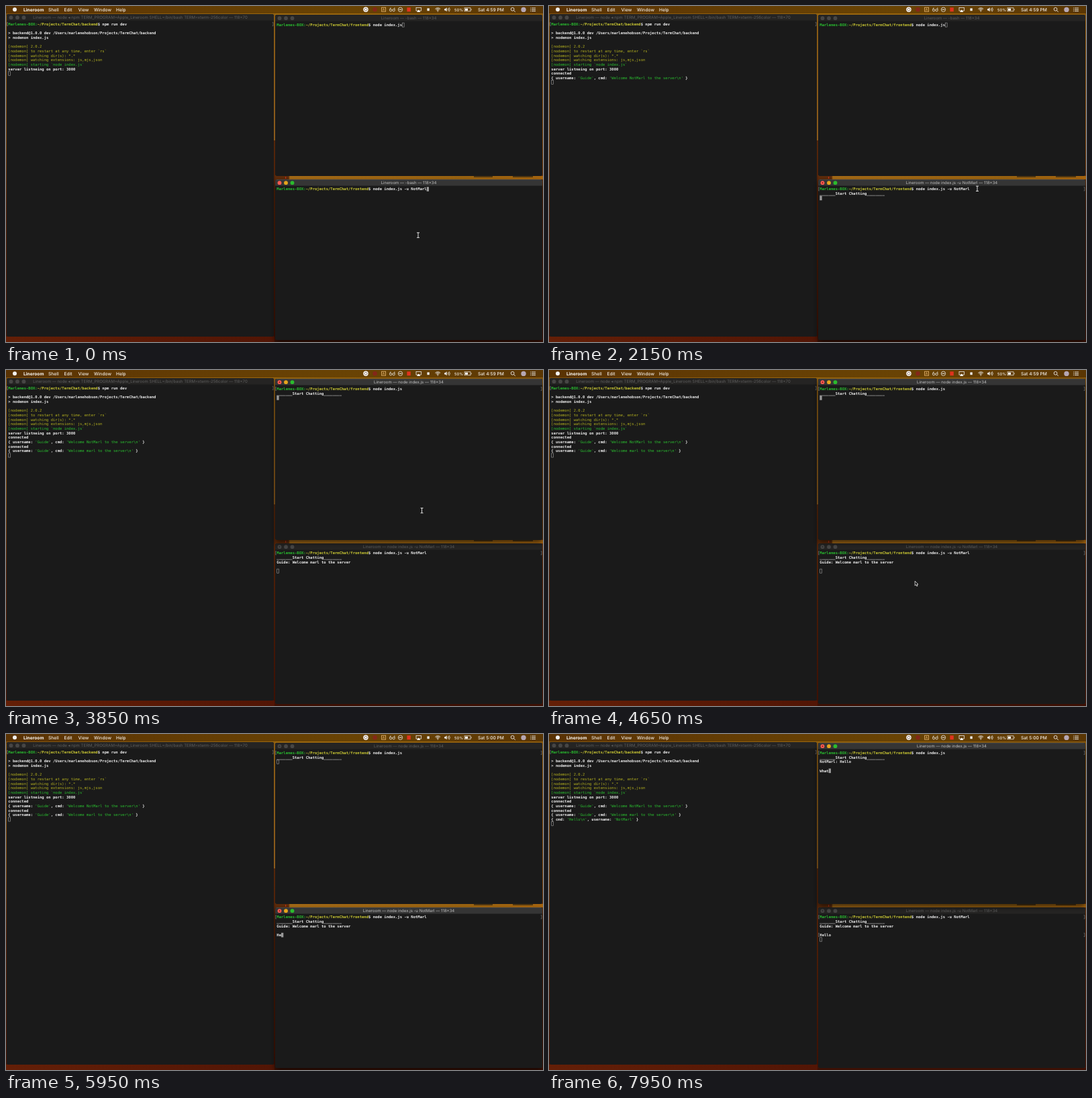
An HTML page with a canvas for the animation above (8 s loop, 800x500 px).

```html
<!DOCTYPE html>
<html lang="en">
<head>
<meta charset="utf-8">
<title>Chat demo</title>
<style>
html, body { margin: 0; width: 100%; height: 100%; overflow: hidden; background: #1a1a1a; }
canvas { display: block; width: 800px; height: 500px; }
</style>
</head>
<body>
<canvas id="stage" width="800" height="500"></canvas>
<script>
const ctx = document.getElementById('stage').getContext('2d');
ctx.textRendering = 'geometricPrecision';

const LOOP = 8000;
const UI = 'Inter, "Open Sans", sans-serif';
const MONO = '"DejaVu Sans Mono", "Liberation Mono", monospace';
const CHAR = 3.334, LINE = 6.655, MONO_SIZE = 5.54;
const WHITE = '#ececec', GREEN = '#2abf30', YELLOW = '#b3b01f', PATH = '#cfcd34';

const APP = 'Lineroom', HOST = 'Marlenes-BOX', HOME = 'marlenehobson';
const NICK = 'NotMarl', FRIEND = 'marl', BOSS = 'Guide';

// Moments of the session, in ms
const T = {
  run1: 1350, join1: 1500, focusTop: 2700, run2: 3450, join2: 3600,
  focusBottom: 4950, clock: 5200, hide1: 5500, send: 6550, show: 6750,
  focusTop2: 7200, hide2: 7450
};
const HELLO = [5750, 5880, 6040, 6180, 6320];
const WHAT = [7550, 7650, 7750, 7870];
const MOUSE = [
  [0, 614, 341], [200, 614, 341], [850, 638, 314], [1950, 638, 314],
  [2150, 638, 272], [2550, 648, 167], [3600, 648, 167], [4500, 546, 318],
  [6750, 546, 318], [7100, 600, 165], [8000, 600, 165]
];

const LEFT = { x: 1, y: 12, w: 398, h: 480, textY: 27 };
const TOP = { x: 401, y: 13, w: 398, h: 240, textY: 28 };
const BOTTOM = { x: 401, y: 258, w: 398, h: 239, textY: 272.4 };

function rect(x, y, w, h, color) {
  ctx.fillStyle = color;
  ctx.fillRect(x, y, w, h);
}

function disc(x, y, r, color) {
  ctx.fillStyle = color;
  ctx.beginPath();
  ctx.arc(x, y, r, 0, 7);
  ctx.fill();
}

function ring(x, y, r, color, width = 0.8) {
  ctx.strokeStyle = color;
  ctx.lineWidth = width;
  ctx.beginPath();
  ctx.arc(x, y, r, 0, 7);
  ctx.stroke();
}

function stroke(points, color, width) {
  ctx.strokeStyle = color;
  ctx.lineWidth = width;
  ctx.beginPath();
  points.forEach(([x, y], i) => i ? ctx.lineTo(x, y) : ctx.moveTo(x, y));
  ctx.stroke();
}

function gradient(x0, y0, x1, y1, stops) {
  const g = ctx.createLinearGradient(x0, y0, x1, y1);
  stops.forEach(([at, color]) => g.addColorStop(at, color));
  return g;
}

// Set large and scaled down evenly, so that small sizes keep exact spacing
function text(s, x, y, size, color, family, weight = 400, align = 'left') {
  ctx.save();
  ctx.translate(x, y);
  ctx.scale(0.1, 0.1);
  ctx.font = `${weight} ${size * 10}px ${family}`;
  ctx.textAlign = align;
  ctx.fillStyle = color;
  ctx.fillText(s, 0, 0);
  ctx.restore();
}

function drawDesktop() {
  rect(0, 0, 800, 500, gradient(0, 0, 0, 500,
    [[0, '#9a6210'], [0.4, '#84490f'], [0.6, '#5c2409'], [1, '#4a1404']]));
  rect(0, 10, 800, 4, gradient(0, 0, 800, 0,
    [[0, '#80500c'], [0.5, '#9c680e'], [1, '#8a590c']]));
  rect(399, 12, 2, 188, gradient(0, 12, 0, 200, [[0, '#8a5c14'], [1, '#8a5a1c']]));
  rect(399, 200, 2, 300, gradient(0, 200, 0, 500, [[0, '#55260a'], [1, '#3d1004']]));
  rect(401, 253, 399, 5, gradient(401, 0, 800, 0,
    [[0, '#5c2a0a'], [0.05, '#5c2a0a'], [0.055, '#a56a16'], [0.7, '#9c6410'], [1, '#a8660f']]));
  rect(697, 253, 28, 2, '#54380f');
  rect(755, 253, 30, 2, '#54380f');
  rect(416, 254, 1.2, 3, '#c2331b');
  rect(0, 492, 400, 8, gradient(0, 0, 400, 0, [[0, '#641f07'], [1, '#521505']]));
  rect(400, 497, 400, 3, '#3c1004');
}

function drawMenuBar(t) {
  rect(0, 0, 800, 11, gradient(0, 0, 800, 0,
    [[0, '#593203'], [0.35, '#643d04'], [0.65, '#694304'], [1, '#5a3604']]));
  disc(13, 5.2, 3, '#f2f2f2');
  text(APP, 26, 7.8, 6.67, '#fff', UI, 700);
  [['Shell', 63], ['Edit', 86.5], ['View', 107.5], ['Window', 131], ['Help', 164]]
    .forEach(([s, x]) => text(s, x, 7.8, 6.67, '#f4f0ec', UI, 500));

  disc(536, 5.3, 3.7, '#fff');
  ring(536, 5.3, 2, '#6a4a35', 0.7);
  disc(549.6, 5.3, 3.2, '#842719');
  ctx.strokeStyle = '#e0b06a';
  ctx.lineWidth = 0.9;
  ctx.strokeRect(559.6, 2.2, 6, 6);
  text('A', 562.6, 7.2, 5, '#e0b06a', UI, 500, 'center');
  ring(573.2, 6.2, 1.7, '#eee');
  ring(577.6, 6.2, 1.7, '#eee');
  stroke([[571.7, 5], [573.2, 2.3]], '#eee', 0.7);
  stroke([[579, 5], [578.8, 2.3]], '#eee', 0.7);
  ring(587.5, 5.3, 3.2, '#eee');
  stroke([[585.4, 5.3], [589.6, 5.3]], '#eee', 1);
  rect(597.4, 2.3, 5.4, 6, '#e0331e');

  ctx.strokeStyle = '#eee';
  ctx.lineWidth = 0.8;
  ctx.strokeRect(611, 2.4, 7.4, 4.6);
  ctx.fillStyle = '#fff';
  ctx.beginPath();
  ctx.moveTo(614.7, 5.5);
  ctx.lineTo(617.4, 9);
  ctx.lineTo(612, 9);
  ctx.fill();
  rect(627.4, 3.4, 3.4, 3.8, '#eee');

  ctx.lineWidth = 0.9;
  [1.8, 3.5, 5.2].forEach(r => {
    ctx.beginPath();
    ctx.arc(643.3, 8, r, -Math.PI * 0.77, -Math.PI * 0.23);
    ctx.stroke();
  });
  disc(643.3, 7.9, 0.7, '#eee');

  ctx.fillStyle = '#eee';
  ctx.beginPath();
  [[653, 4.2], [654.4, 4.2], [656.6, 2.3], [656.6, 8.3], [654.4, 6.4], [653, 6.4]]
    .forEach(([x, y]) => ctx.lineTo(x, y));
  ctx.fill();
  ctx.lineWidth = 0.7;
  [2, 3.5, 5].forEach(r => {
    ctx.beginPath();
    ctx.arc(656.3, 5.3, r, -0.7, 0.7);
    ctx.stroke();
  });

  text('50%', 668, 7.5, 5.8, '#f4f0ec', UI, 500);
  ctx.strokeRect(683, 2.8, 9, 5);
  rect(684, 3.8, 4, 3, '#fff');
  rect(692.7, 4.3, 0.8, 2, '#eee');
  text(t < T.clock ? 'Sat 4:59 PM' : 'Sat 5:00 PM', 703, 7.8, 6.67, '#f4f0ec', UI, 500);
  ring(754.6, 4.8, 2.4, '#eee', 0.9);
  stroke([[756.4, 6.6], [758.7, 8.8]], '#eee', 1);
  disc(771, 5.4, 3.7, '#b6a7b4');
  [3, 5.3, 7.6].forEach(y => {
    rect(781, y - 0.4, 1, 0.9, '#eee');
    rect(783, y - 0.4, 6, 0.9, '#eee');
  });
}

function drawWindow(win, title, active, running) {
  const { x, y, w, h } = win;
  ctx.save();
  if (active) {
    ctx.shadowColor = 'rgba(0,0,0,.6)';
    ctx.shadowBlur = 9;
    ctx.shadowOffsetY = 4;
  }
  ctx.fillStyle = '#1a1a1a';
  ctx.beginPath();
  ctx.roundRect(x, y, w, h, 2.5);
  ctx.fill();
  ctx.restore();
  ctx.fillStyle = active ? '#353535' : '#252423';
  ctx.beginPath();
  ctx.roundRect(x, y, w, 9.6, [2.5, 2.5, 0, 0]);
  ctx.fill();
  if (active) rect(x + 2, y, w - 4, 0.6, '#505050');
  const cy = y + 5.2;
  ['#fb5a50', '#e5a51c', '#2bbb2e'].forEach((color, i) =>
    disc(x + 6.5 + i * 9.5, cy, 2.9, active ? color : '#474645'));
  if (running) disc(x + 6.5, cy, 0.9, active ? '#6e1510' : '#262626');
  text(title, x + w / 2, cy + 2.2, 6.05, active ? '#c2c2c2' : '#5e5e5e', UI, 400, 'center');
}

// A line is a list of [string, color, weight] pieces
function drawLine(win, row, pieces) {
  let col = 0;
  const y = win.textY + row * LINE + 2;
  pieces.forEach(([s, color, weight = 700]) => {
    text(s, win.x + 2.3 + col * CHAR, y, MONO_SIZE, color, MONO, weight);
    col += s.length;
  });
  return col;
}

function drawMark(win, row) {
  const y = win.textY + row * LINE;
  const l = win.x + 0.6, r = win.x + win.w - 1;
  stroke([[l + 1.3, y - 2.7], [l, y - 2.7], [l, y + 2.5], [l + 1.3, y + 2.5]], '#777', 0.7);
  stroke([[r - 1.3, y - 2.7], [r, y - 2.7], [r, y + 2.5], [r - 1.3, y + 2.5]], '#777', 0.7);
}

function drawCaret(win, row, col, active) {
  const x = win.x + 2.3 + col * CHAR, y = win.textY + row * LINE - 3.2;
  if (active) {
    rect(x, y, CHAR, LINE, '#9a9a9a');
  } else {
    ctx.strokeStyle = '#a0a0a0';
    ctx.lineWidth = 0.6;
    ctx.strokeRect(x + 0.4, y + 0.3, CHAR - 0.6, LINE - 0.6);
  }
}

const white = s => [[s, WHITE]];
const prompt = (dir, cmd) => [
  [HOST + ':', GREEN], ['~/Projects/TermChat/' + dir, PATH], ['$ ' + cmd, WHITE]
];
const nodemon = (s, color = YELLOW) => [['[nodemon] ' + s, color, 400]];
const welcome = who => [
  ['{ username: ', WHITE], [`'${BOSS}'`, GREEN, 400], [', cmd: ', WHITE],
  [`'Welcome ${who} to the server\\n'`, GREEN, 400], [' }', WHITE]
];

function drawSession(win, title, lines, marks, active, running) {
  drawWindow(win, title, active, running);
  let col = 0;
  lines.forEach((line, row) => { col = drawLine(win, row, line); });
  marks.forEach(row => drawMark(win, row));
  drawCaret(win, lines.length - 1, col, active);
}

function drawServer(t) {
  const lines = [
    prompt('backend', 'npm run dev'), [],
    white(`> backend@1.0.0 dev /Users/${HOME}/Projects/TermChat/backend`),
    white('> nodemon index.js'), [],
    nodemon('2.0.2'), nodemon('to restart at any time, enter `rs`'),
    nodemon('watching dir(s): *.*'), nodemon('watching extensions: js,mjs,json'),
    nodemon('starting `node index.js`', GREEN),
    white('server listneing on port: 3000')
  ];
  if (t >= T.join1) lines.push(white('connected'), welcome(NICK));
  if (t >= T.join2) lines.push(white('connected'), welcome(FRIEND));
  if (t >= T.send + 50) lines.push([
    ['{ cmd: ', WHITE], ["'Hello\\n'", GREEN, 400], [', username: ', WHITE],
    [`'${NICK}'`, GREEN, 400], [' }', WHITE]
  ]);
  lines.push([]);
  const title = `${APP} — node ◂ npm TERM_PROGRAM=Apple_${APP} SHELL=/bin/bash TERM=xterm-256color — 118×70`;
  drawSession(LEFT, title, lines, [0], false, false);
}

const typed = (word, times, t) => word.slice(0, times.filter(at => t >= at).length);
const START = white('_______Start Chatting________');

function drawTop(t, active) {
  const lines = [prompt('frontend', 'node index.js')];
  const running = t >= T.run2;
  if (running) lines.push(t >= T.join2 ? START : []);
  if (t >= T.send + 50) lines.push(white(NICK + ': Hello'), []);
  if (t >= T.join2) lines.push(white(typed('What', WHAT, t)));
  const job = running ? 'node index.js' : '-bash';
  drawSession(TOP, `${APP} — ${job} — 118×34`, lines, running ? [0] : [], active, running);
}

function drawBottom(t, active) {
  const cmd = 'node index.js -u ' + NICK;
  const lines = [prompt('frontend', cmd)];
  const running = t >= T.run1, sent = t >= T.send;
  const marks = running ? [0] : [];
  if (running) lines.push(t >= T.join1 ? START : []);
  if (t >= T.join2) lines.push(white(`${BOSS}: Welcome ${FRIEND} to the server`), []);
  if (t >= T.join1) lines.push(white(typed('Hello', HELLO, t)));
  if (sent) {
    lines.push([]);
    marks.push(4);
  }
  drawSession(BOTTOM, `${APP} — ${running ? cmd : '-bash'} — 118×34`, lines, marks, active, running);
}

function mouseAt(t) {
  const i = MOUSE.findIndex(k => k[0] > t);
  const [t0, x0, y0] = MOUSE[i - 1], [t1, x1, y1] = MOUSE[i];
  const k = (t - t0) / (t1 - t0);
  return [x0 + (x1 - x0) * k, y0 + (y1 - y0) * k];
}

function drawMouse(t, topActive) {
  if ((t >= T.hide1 && t < T.show) || t >= T.hide2) return;
  const [x, y] = mouseAt(t);
  const overTop = y < 256;
  ctx.save();
  ctx.translate(x, y);
  if (overTop === topActive) {
    [['#111', 2.2], ['#e8e8e8', 1]].forEach(([color, width]) => {
      stroke([[-2, -3.7], [2, -3.7]], color, width);
      stroke([[-2, 3.7], [2, 3.7]], color, width);
      stroke([[0, -3.7], [0, 3.7]], color, width);
    });
  } else {
    ctx.beginPath();
    [[-0.8, -4], [-0.8, 2.8], [0.8, 1.4], [1.9, 3.8], [3, 3.3], [2, 1], [4, 1]]
      .forEach(([px, py]) => ctx.lineTo(px, py));
    ctx.closePath();
    ctx.fillStyle = '#111';
    ctx.fill();
    ctx.strokeStyle = '#e8e8e8';
    ctx.lineWidth = 0.8;
    ctx.stroke();
  }
  ctx.restore();
}

function draw(t) {
  const topActive = (t >= T.focusTop && t < T.focusBottom) || t >= T.focusTop2;
  drawDesktop();
  drawServer(t);
  // The focused window lies above the other and shades it
  if (topActive) {
    drawBottom(t, false);
    drawTop(t, true);
  } else {
    drawTop(t, false);
    drawBottom(t, true);
  }
  drawMenuBar(t);
  drawMouse(t, topActive);
}

const begin = performance.now();
function tick() {
  draw((performance.now() - begin) % LOOP);
  requestAnimationFrame(tick);
}
tick();
</script>
</body>
</html>
```
